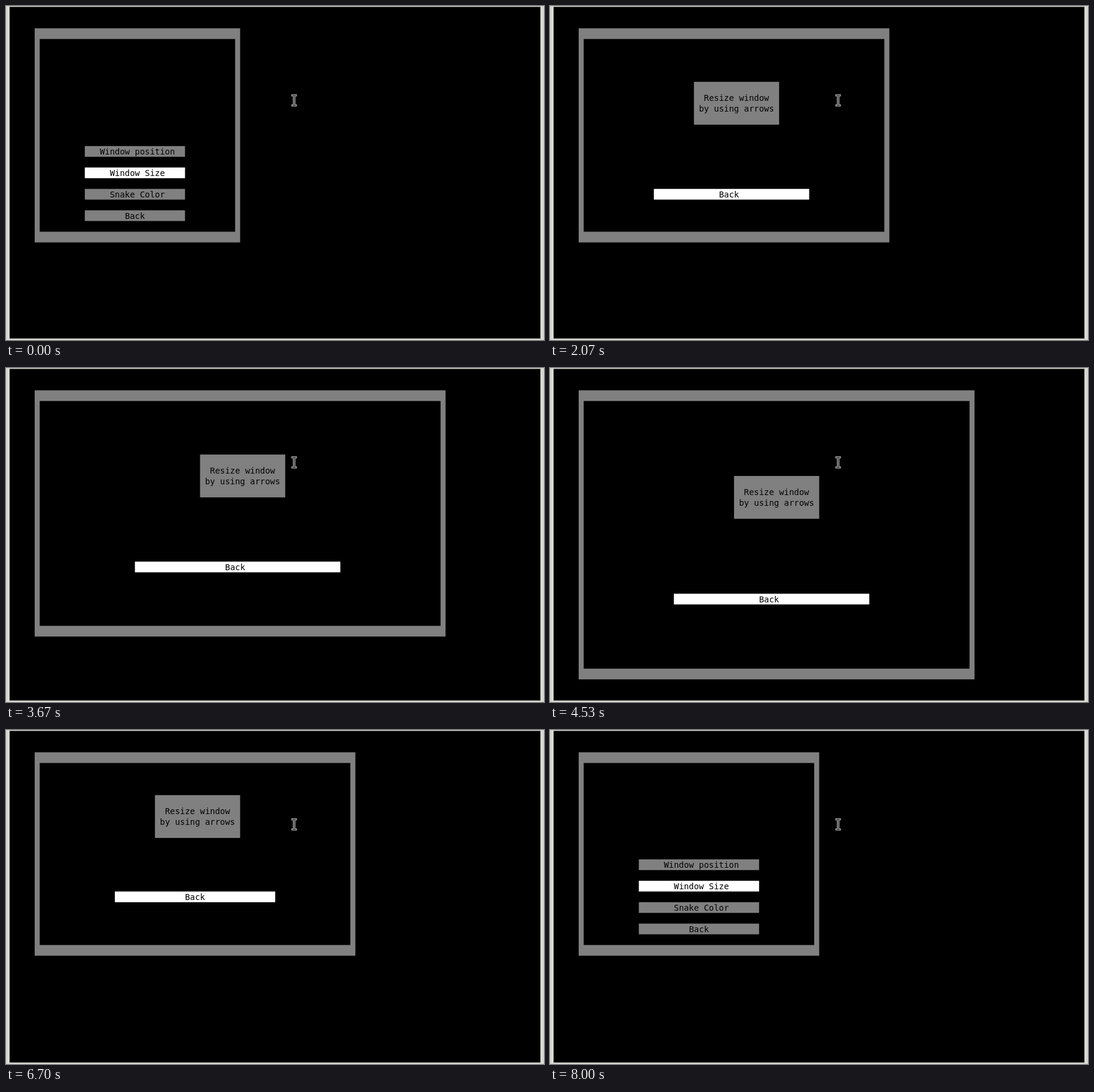
Write an HTML page with a canvas that moves like this. It is 900x560 px and loops after 8330 ms.

```html
<!DOCTYPE html>
<html lang="en">
<head>
<meta charset="utf-8">
<title>Terminal window resize</title>
<style>
  html, body { margin: 0; width: 100%; height: 100%; overflow: hidden; background: #000; }
  canvas { display: block; }
</style>
</head>
<body>
<canvas id="stage" width="900" height="560"></canvas>
<script>
const ctx = document.getElementById('stage').getContext('2d');
const LOOP = 8330, OPEN_RESIZE = 330, CLOSE_RESIZE = 7800;
const CELL_W = 8.382, CELL_H = 17.95;
const LEFT = 48, TOP = 37.4;
const GREY = '#808080', WHITE = '#fff', BLACK = '#000', EDGE = '#d8d8d2';
const MENU = ['Window position', 'Window Size', 'Snake Color', 'Back'];
const SELECTED = 1;
const half = n => Math.floor(n / 2);
const quarter = n => Math.floor(n / 4);

// Each held arrow key steps once on press, then repeats at a steady rate.
const REPEAT_MS = 54;
const START = { cols: 41, rows: 20 };
const HOLDS = [
  { axis: 'cols', step: 1, press: 630, repeat: 1000, count: 41 },
  { axis: 'rows', step: 1, press: 3170, repeat: 3610, count: 7 },
  { axis: 'cols', step: -1, press: 4000, repeat: 4430, count: 17 },
  { axis: 'rows', step: -1, press: 5270, repeat: 5770, count: 8 },
  { axis: 'cols', step: -1, press: 6270, repeat: 6730, count: 17 }
];

function stepsTaken({ press, repeat, count }, t) {
  if (t < press) return 0;
  if (t < repeat) return 1;
  return Math.min(count, 2 + Math.floor((t - repeat) / REPEAT_MS));
}

function sizeAt(t) {
  const size = { ...START };
  for (const hold of HOLDS) size[hold.axis] += hold.step * stepsTaken(hold, t);
  return size;
}

function rect(color, x, y, w, h) {
  ctx.fillStyle = color;
  ctx.fillRect(x, y, w, h);
}

function cells(color, col, row, w, h) {
  rect(color, LEFT + col * CELL_W, TOP + row * CELL_H, w * CELL_W, h * CELL_H);
}

function label(text, col, row) {
  ctx.fillStyle = BLACK;
  ctx.fillText(text, LEFT + col * CELL_W, TOP + row * CELL_H + 14.2);
}

function button(text, cols, row, active) {
  const x = quarter(cols), w = half(cols);
  cells(active ? WHITE : GREY, x, row, w, 1);
  label(text, x + half(w) - half(text.length), row);
}

function drawMenu(cols, rows) {
  MENU.forEach((text, i) => button(text, cols, half(rows) + 1 + 2 * i, i === SELECTED));
}

function drawResize(cols, rows) {
  const x = half(cols) - 8, y = half(rows) - 5;
  cells(GREY, x, y, 17, 4);
  label('Resize window', x + 2, y + 1);
  label('by using arrows', x + 1, y + 2);
  button('Back', cols, half(rows) + quarter(rows), true);
}

function drawTerminalEdge() {
  rect(EDGE, 0, 0, 900, 560);
  rect(BLACK, 6, 1.5, 888, 556);
}

function drawPointer() {
  const beam = new Path2D('M478 148.5H486V151H483.5V165.5H486V168H478V165.5H480.5V151H478Z');
  ctx.fillStyle = '#444';
  ctx.fill(beam);
  ctx.strokeStyle = '#a8a8a8';
  ctx.lineWidth = 1.2;
  ctx.stroke(beam);
}

function draw(t) {
  const { cols, rows } = sizeAt(t);
  const resizing = t >= OPEN_RESIZE && t < CLOSE_RESIZE;
  drawTerminalEdge();
  cells(GREY, 0, 0, cols, rows);
  cells(BLACK, 1, 1, cols - 2, rows - 2);
  ctx.font = '13.92px "DejaVu Sans Mono", monospace';
  (resizing ? drawResize : drawMenu)(cols, rows);
  drawPointer();
}

function tick() {
  draw(performance.now() % LOOP);
  requestAnimationFrame(tick);
}
tick();
</script>
</body>
</html>
```
